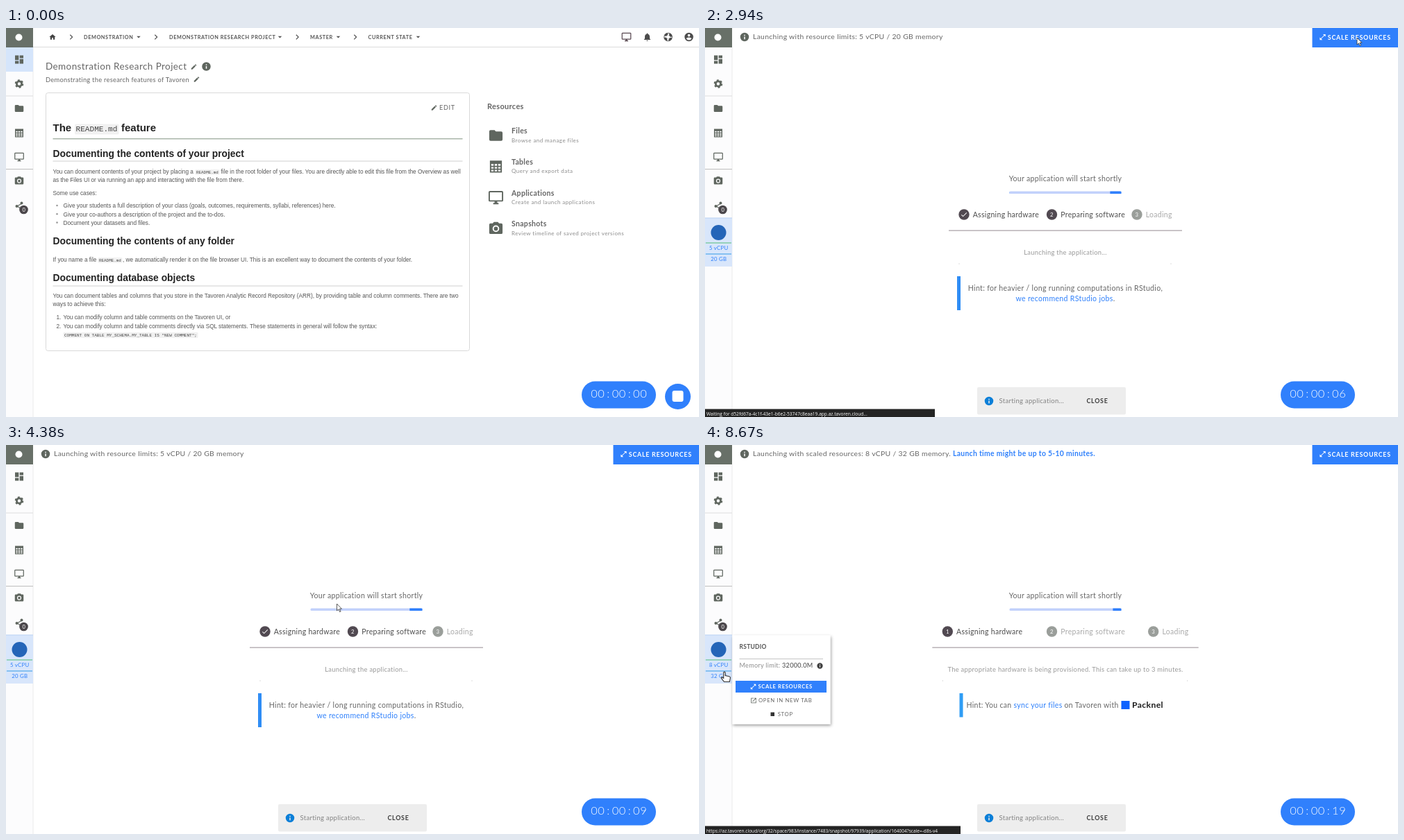
Write an HTML page that moves like this. It is 998 px wide and 561 px high and loops after 8700 ms.

```html
<!DOCTYPE html>
<html lang="en">
<head>
<meta charset="utf-8">
<title>Scaling an application</title>
<style>
html, body { margin: 0; width: 100%; height: 100%; overflow: hidden; background: #fff; }
svg { display: block; width: 998px; height: 561px; }
text { font-family: Lato, sans-serif; letter-spacing: .03em; fill: #666; white-space: pre; }
.b { font-weight: 700; }
.u { letter-spacing: .08em; }
.s { letter-spacing: .055em; fill: #8c8c8c; }
.w { fill: #fff; }
.m { text-anchor: middle; }
.l { fill: #2f80fb; }
.r { font-family: "Liberation Sans", Arial, sans-serif; letter-spacing: 0; fill: #555; }
.h { font-weight: 700; fill: #222; }
.c { font-family: "Liberation Mono", monospace; letter-spacing: 0; fill: #444; }
.st { font-family: "Open Sans", sans-serif; letter-spacing: 0; fill: #fff; }
.digit { font-weight: 300; letter-spacing: 0; }
</style>
</head>
<body>
<svg id="stage" viewBox="0 0 998 561" xmlns="http://www.w3.org/2000/svg"></svg>
<script>
const LOOP = 8700, BLUE = '#3080fc', GREY = '#5f665f';

const ICONS = {
  dash: 'M3 13h8V3H3zM3 21h8v-6H3zM13 21h8V11h-8zM13 3v6h8V3z',
  folder: 'M10 4H4a2 2 0 0 0-2 2v12a2 2 0 0 0 2 2h16a2 2 0 0 0 2-2V8a2 2 0 0 0-2-2h-8z',
  table: 'M3 3h18v18H3zM5 8v3h3.5V8zm5.2 0v3h3.6V8zm5.3 0v3H19V8zM5 12.6v2.6h3.5v-2.6zm5.2 0v2.6h3.6v-2.6zm5.3 0v2.6H19v-2.6zM5 16.8v2.4h3.5v-2.4zm5.2 0v2.4h3.6v-2.4zm5.3 0v2.4H19v-2.4z',
  screen: 'M21 2H3a2 2 0 0 0-2 2v12a2 2 0 0 0 2 2h7v2H8v2h8v-2h-2v-2h7a2 2 0 0 0 2-2V4a2 2 0 0 0-2-2zm0 14H3V4h18z',
  camera: 'M9 2 7.2 4H4a2 2 0 0 0-2 2v12a2 2 0 0 0 2 2h16a2 2 0 0 0 2-2V6a2 2 0 0 0-2-2h-3.2L15 2zm3 15a5 5 0 1 1 0-10 5 5 0 0 1 0 10zm0-2a3 3 0 1 0 0-6 3 3 0 0 0 0 6z',
  home: 'M10 20v-6h4v6h5v-8h3L12 3 2 12h3v8z',
  bell: 'M12 22a2 2 0 0 0 2-2h-4a2 2 0 0 0 2 2zm6-6v-5c0-3-1.6-5.6-4.5-6.3V4a1.5 1.5 0 0 0-3 0v.7C7.6 5.4 6 8 6 11v5l-2 2v1h16v-1z',
  pencil: 'M3 17.2V21h3.8L17.8 9.9l-3.7-3.7zM20.7 7a1 1 0 0 0 0-1.4l-2.3-2.3a1 1 0 0 0-1.4 0l-1.9 1.8 3.8 3.8z',
  info: 'M12 2a10 10 0 1 0 0 20 10 10 0 0 0 0-20zm1.2 15h-2.4v-6h2.4zm0-8h-2.4V6.6h2.4z',
  user: 'M12 2a10 10 0 1 0 0 20 10 10 0 0 0 0-20zm0 3a3 3 0 1 1 0 6 3 3 0 0 1 0-6zm0 14.2a7.2 7.2 0 0 1-6-3.2c0-2 4-3.1 6-3.1s6 1.1 6 3.1a7.2 7.2 0 0 1-6 3.2z',
  next: 'M8.6 16.6 13.2 12 8.6 7.4 10 6l6 6-6 6z',
  caret: 'M6 9.5l6 6 6-6z',
  open: 'M19 19H5V5h7V3H3v18h18v-9h-2zM14 3v2h3.6l-9.8 9.8 1.4 1.4L19 6.4V10h2V3z',
  scale: 'M21 11V3h-8l3.3 3.3-10 10L3 13v8h8l-3.3-3.3 10-10z',
  check: 'M9 16.2 4.8 12l-1.4 1.4L9 19 21 7l-1.4-1.4z',
  close: 'M19 6.4 17.6 5 12 10.6 6.4 5 5 6.4l5.6 5.6L5 17.6 6.4 19l5.6-5.6 5.6 5.6 1.4-1.4-5.6-5.6z',
  hand: 'M8 22 3 15.5q-1-2 .8-2.3L7 15V4.5a1.6 1.6 0 0 1 3.2 0V10l7.6 1.6q2.2.6 2.2 2.6L18.5 22z'
};

const icon = (name, x, y, size, fill = GREY, extra = '') =>
  `<path d="${ICONS[name]}" fill="${fill}" fill-rule="evenodd" transform="translate(${x - size / 2} ${y - size / 2}) scale(${size / 24})" ${extra}/>`;
const text = (x, y, size, str, cls = '', fill = '') =>
  `<text x="${x}" y="${y}" font-size="${size}" class="${cls}"${fill && ` style="fill:${fill}"`}>${str}</text>`;
const rect = (x, y, w, h, fill, extra = '') =>
  `<rect x="${x}" y="${y}" width="${w}" height="${h}" fill="${fill}" ${extra}/>`;
const disc = (x, y, r, fill, extra = '') => `<circle cx="${x}" cy="${y}" r="${r}" fill="${fill}" ${extra}/>`;
const group = (id, body, extra = '') => `<g id="${id}" ${extra}>${body}</g>`;

function topNav() {
  const crumbs = [['DEMONSTRATION', 94, 112, 191], ['DEMONSTRATION RESEARCH PROJECT', 216, 235, 394.5],
    ['MASTER', 419.5, 438, 478.5], ['CURRENT STATE', 503, 521.5, 593.5]];
  return rect(39, 27, 959, 1, '#dcdcdc') + icon('home', 67, 13, 11, '#444') +
    crumbs.map(([s, a, x, c]) => icon('next', a, 13, 15, '#555') +
      text(x, 16, 7.3, s, 'u b', '#555') + icon('caret', c, 13, 11, '#555')).join('') +
    icon('screen', 893.5, 13, 15, '#5a4a52') + icon('bell', 923.5, 13, 14, '#4c4c4c') +
    disc(953.5, 13, 4.4, 'none', 'stroke="#4c4c4c" stroke-width="3.4" stroke-dasharray="4.6 2.31" stroke-dashoffset="-1.2"') +
    disc(953.5, 13, 5.7, 'none', 'stroke="#4c4c4c"') + icon('user', 983.5, 13, 15, '#4c4c4c');
}

function readme() {
  const code = (x, y, s, size, w) => rect(x, y - size * .95, w, size * 1.35, '#f1f1f1', 'rx="1.5"') + text(x + 1.5, y, size, s, 'c');
  const p = (x, y, s) => text(x, y, 8.26, s, 'r');
  const h = (y, s, size = 13.85) => text(67.5, y, size, s, 'r h');
  const items = ['Give your students a full description of your class (goals, outcomes, requirements, syllabi, references) here.',
    'Give your co-authors a description of the project and the to-dos.', 'Document your datasets and files.'];
  return rect(57.5, 93.5, 610, 372, '#fff', 'rx="3" stroke="#d9d9d9"') +
    icon('pencil', 616.5, 115, 10) + text(624, 118, 9, 'EDIT', 'u') +
    h(149, 'The', 15) + code(99, 149, 'README.md', 11.1, 63.5) + text(166, 149, 15, 'feature', 'r h') +
    rect(67.5, 159, 590, 1.5, '#a9b6a9') +
    h(185.5, 'Documenting the contents of your project') + rect(67.5, 191.5, 590, 1, '#d0d0d0') +
    p(67.5, 209.5, 'You can document contents of your project by placing a') + code(272.5, 209.5, 'README.md', 5.9, 35) +
    p(309.5, 209.5, 'file in the root folder of your files. You are directly able to edit this file from the Overview as well') +
    p(67.5, 222, 'as the Files UI or via running an app and interacting with the file from there.') +
    p(67.5, 240.5, 'Some use cases:') +
    items.map((s, i) => disc(73.5, 256 + i * 12.3, 1.3, '#999') + p(82.5, 259.3 + i * 12.3, s)).join('') +
    h(312, 'Documenting the contents of any folder') +
    p(67.5, 336.5, 'If you name a file') + code(132.5, 336.5, 'README.md', 5.9, 35) +
    p(168, 336.5, ', we automatically render it on the file browser UI. This is an excellent way to document the contents of your folder.') +
    h(364.5, 'Documenting database objects') + rect(67.5, 371.5, 590, 1, '#d0d0d0') +
    p(67.5, 388.5, 'You can document tables and columns that you store in the Tavoren Analytic Record Repository (ARR), by providing table and column comments. There are two') +
    p(67.5, 401, 'ways to achieve this:') +
    p(72.5, 420, '1.') + p(82.5, 420, 'You can modify column and table comments on the Tavoren UI, or') +
    p(72.5, 432.5, '2.') + p(82.5, 432.5, 'You can modify column and table comments directly via SQL statements. These statements in general will follow the syntax:') +
    code(82.5, 444.5, 'COMMENT ON TABLE MY_SCHEMA.MY_TABLE IS "NEW COMMENT";', 6, 194);
}

function overview() {
  const links = [['folder', 'Files', 'Browse and manage files'], ['table', 'Tables', 'Query and export data'],
    ['screen', 'Applications', 'Create and launch applications'], ['camera', 'Snapshots', 'Review timeline of saved project versions']];
  return text(57, 60, 13.5, 'Demonstration Research Project') + icon('pencil', 270.5, 56, 10) + icon('info', 288.5, 55.5, 15) +
    text(57, 77.5, 9.3, 'Demonstrating the research features of Tavoren') + icon('pencil', 274.5, 74, 10) + readme() +
    text(693, 116.5, 11, 'Resources', 'b') +
    links.map(([i, a, b], n) => icon(i, 705.5, 155 + n * 44.8, 23) +
      text(728, 152 + n * 44.8, 10.5, a, 'b') + text(728, 164.5 + n * 44.8, 8, b, 's')).join('') +
    disc(967.5, 531.5, 18.5, BLUE) + rect(959.5, 523, 16, 16, '#fff', 'rx="3"');
}

const appList = () => text(57, 60, 13.5, 'Applications') + text(57, 77.5, 9.3, 'Create and launch applications') +
  rect(57.5, 188.5, 610, 44, '#fff', 'rx="3" stroke="#d9d9d9"') + disc(80, 210.5, 11, '#2465b8') + text(104, 214, 10.6, 'RStudio', 'l');

function sidebar() {
  const share = '<path d="M23 253 16 257l7 4" fill="none" stroke="#5f665f" stroke-width="1.2"/>' +
    disc(22.5, 252.5, 2, GREY) + disc(15.5, 257, 2, GREY) + disc(22, 261, 2, GREY);
  return rect(0, 0, 39, 561, '#fcfcfd') + rect(38.5, 28, 1, 533, '#ececec') +
    rect(0, 0, 39, 28, '#687068') + disc(18.5, 13.5, 5, '#fff') +
    group('navHome', rect(0, 28, 39, 35, '#d5e5fb')) + group('navApps', rect(0, 169, 39, 34, '#d5e5fb')) +
    icon('dash', 19, 45.5, 16) + disc(19, 80.5, 3.6, 'none', `stroke="${GREY}" stroke-width="2.8"`) +
    disc(19, 80.5, 5.3, 'none', `stroke="${GREY}" stroke-width="2" stroke-dasharray="2.8 2.75"`) +
    rect(0, 97.5, 39, 1, '#ddd') + icon('folder', 19, 116, 15) + icon('table', 19, 151.5, 16) + icon('screen', 19, 186, 15) +
    rect(0, 203, 39, 1.2, '#c4c4c4') + icon('camera', 19, 220.5, 15) + share +
    disc(25.5, 262, 6.3, '#4b474b') + text(25.7, 264.8, 7.5, '0', 'm w') +
    group('navR', rect(0, 274, 39, 70, '#d8e6fb') + rect(0, 273.5, 39, 1, '#bcd3f3') + disc(19.5, 295, 11, '#2465b8') +
      rect(1, 309, 37, 1.8, '#8fd0b4') + rect(1, 325, 37, 1.8, '#7dbcf0') +
      '<text id="cpu" x="19.7" y="320" font-size="7.8" class="m l"></text><text id="mem" x="19.7" y="336" font-size="7.8" class="m l"></text>');
}

function stepper(id, spread, active) {
  const labels = ['Assigning hardware', 'Preparing software', 'Loading'];
  const xs = [373 - spread, 499.5, 622 + spread];
  return group(id, labels.map((s, i) => {
    const on = i <= active;
    return disc(xs[i], 269, 7.7, on ? '#514951' : '#9a9e9a') +
      (i < active ? icon('check', xs[i], 269, 11, '#fff') : text(xs[i], 271.8, 7.8, i + 1, 'm w')) +
      text(xs[i] + 12.7, 272.5, 10.5, s, '', on ? '#4c4c4c' : '#a9a9a9');
  }).join('') + rect(351 - spread, 291.5, 336 + 2 * spread, 1.2, '#a59da3') +
    rect(365.5 - spread, 339.5, 1, 1, '#bbb') + rect(670.5 + spread, 339.5, 1, 1, '#bbb'));
}

const launch = () => text(519, 221, 10.6, 'Your application will start shortly', 'm') +
  rect(438.5, 235.5, 161, 3.6, '#c2d1fb', 'rx="1.5"') +
  group('bars', rect(0, 235.5, 0, 3.6, BLUE, 'id="short"') + rect(0, 235.5, 0, 3.6, BLUE, 'id="long"'), 'clip-path="url(#track)"') +
  stepper('stepsA', 0, 0) + stepper('stepsB', 0, 1) + stepper('stepsW', 23.7, 0) +
  '<text id="note" x="519" y="326.5" font-size="9.4" class="m" style="fill:#999"></text>' +
  group('hintJobs', rect(363, 358, 5, 49, '#2f8df5') + text(519, 378.5, 10.6, 'Hint: for heavier / long running computations in RStudio,', 'm') +
    text(519, 393.5, 10.6, '<tspan class="l">we recommend RStudio jobs</tspan>.', 'm')) +
  group('hintSync', rect(366.5, 358, 5, 34.5, '#2f9df5') +
    text(376.5, 379, 10.5, 'Hint: You can <tspan class="l">sync your files</tspan> on Tavoren with') +
    rect(599.5, 369, 12, 12, '#0f62fe') + text(615, 379.2, 12.2, 'Packnel', 'b', '#1b1b1b'));

const topBar = () => rect(39, 0, 959, 28, '#fff') + icon('info', 57, 13, 15) +
  '<text id="limits" x="69" y="16.3" font-size="10.4"></text>' +
  rect(874.5, 0, 123.5, 28, BLUE) + icon('scale', 889.5, 13, 11, '#fff') + text(896.8, 16.5, 8.95, 'SCALE RESOURCES', 'b u w');

function dialog() {
  const plans = [['8 vCPU / 32 GB', '0.07', '1.75'], ['16 vCPU / 64 GB', '0.15', '3.51'], ['32 vCPU / 128 GB', '0.29', '7.01'],
    ['64 vCPU / 256 GB', '0.58', '14.03'], ['120 vCPU / 456 GB', '0.71', '17.10']];
  return rect(374, 96, 249.5, 370, '#fff', 'rx="3" filter="url(#deep)"') +
    text(389, 121, 13.6, 'Scale resources', '', '#555') + icon('close', 597, 116.5, 15) +
    text(389, 149, 9.4, 'Select the required resource requirements - the', '', '#8d8d8d') +
    text(389, 162.5, 9.4, 'application will then be restarted.', '', '#8d8d8d') +
    text(399, 189.3, 8.9, 'CPU NODES', 'u', '#555') + text(477, 189.3, 8.9, 'GPU NODES', 'u', '#8a8a8a') +
    rect(389, 200, 78, 1.5, '#6a6068') +
    plans.map(([s, h, d], i) => {
      const y = 211.3 + i * 50.5;
      return rect(389, y, 219.5, 22.5, BLUE, i ? '' : 'id="first"') + text(498.8, y + 14.7, 9.8, s + ' mem', 'b m u w') +
        text(498.8, y + 33.7, 8.4, `Price: <tspan class="b">${h} credits / hour,</tspan> ${d} credits / day`, 'm') +
        (i < 4 ? rect(389, y + 39.8, 219.5, 1, '#c9c9c9') : '');
    }).join('');
}

const popup = () => rect(39.5, 274.5, 141, 128, '#fff', 'filter="url(#soft)"') +
  text(49.5, 294, 8.5, 'RSTUDIO', 'b', '#555') + rect(49.5, 308, 120.5, 1, '#c4c4c4') +
  text(49.5, 321.3, 9.1, 'Memory limit: <tspan style="fill:#444">32000.0M</tspan>', '', '#8d8d8d') + icon('info', 165.5, 318.5, 10, '#444') +
  rect(44, 340, 131, 17, BLUE) + icon('scale', 69.5, 348.5, 10, '#fff') + text(76.5, 351.3, 7.7, 'SCALE RESOURCES', 'b u w') +
  icon('open', 70, 368.5, 10) + text(77, 371.3, 7.8, 'OPEN IN NEW TAB', 'u') +
  rect(94.5, 385.5, 5.5, 5.5, '#333') + text(104.7, 391.2, 7.8, 'STOP', 'u');

const digits = Array.from({ length: 8 }, (_, i) => `<text x="${847 + i * 10.15}" y="533" font-size="16.5" class="m w digit"></text>`).join('');

document.getElementById('stage').innerHTML =
  `<defs><clipPath id="track"><rect x="438.5" y="235" width="161" height="5" rx="1.5"/></clipPath>
  <filter id="deep" x="-25%" y="-25%" width="150%" height="150%"><feDropShadow dx="0" dy="5" stdDeviation="11" flood-color="#3a1c3a" flood-opacity=".55"/></filter>
  <filter id="soft" x="-20%" y="-20%" width="140%" height="140%"><feDropShadow dx="1" dy="2" stdDeviation="2.2" flood-opacity=".4"/></filter></defs>` +
  rect(0, 0, 998, 561, '#fff') + group('nav', topNav()) + group('overview', overview()) + group('apps', appList()) +
  group('launch', launch()) + group('topBar', topBar()) + sidebar() + group('popup', popup()) +
  rect(0, 0, 998, 561, '#212121', 'id="shade"') + group('dialog', dialog()) +
  group('snack', rect(392, 518, 214, 39.5, '#ededed', 'rx="2"') + icon('info', 409, 538, 15, '#0b7fd8') +
    text(423.5, 541.3, 9.5, 'Starting application...', '', '#828282') + text(549.5, 541.3, 8.9, 'CLOSE', 'b u', '#3c3c3c')) +
  group('status', rect(0, 549.5, 331, 12, '#242424', 'id="statusBox"') + '<text id="statusText" x="2" y="558.6" font-size="6.6" class="st"></text>') +
  rect(829, 509.5, 107, 39, BLUE, 'rx="19.5"') + digits +
  group('arrow', '<path d="M0 0v10l2.4-2.1 1.7 3.8 1.5-.7-1.7-3.7h3.1z" fill="#fff" stroke="#333" stroke-width=".8"/>') +
  group('hand', icon('hand', 2.5, 8, 18, '#fff', 'stroke="#333" stroke-width="1.5"'));

const el = {};
document.querySelectorAll('#stage [id]').forEach(e => el[e.id] = e);
const digitEls = document.querySelectorAll('.digit');

const show = (id, on) => el[id].setAttribute('visibility', on ? 'visible' : 'hidden');
const put = (id, str) => {
  if (el[id].shown !== str) el[id].innerHTML = el[id].shown = str;
};
const clamp = v => Math.max(0, Math.min(1, v));
const mix = (a, b, k) => a + (b - a) * k;
const smooth = k => k * k * (3 - 2 * k);

function bezier(x1, y1, x2, y2) {
  const at = (a, b, s) => 3 * a * s * (1 - s) ** 2 + 3 * b * s * s * (1 - s) + s ** 3;
  return x => {
    let lo = 0, hi = 1;
    for (let i = 0; i < 24; i++) {
      const s = (lo + hi) / 2;
      if (at(x1, x2, s) < x) lo = s; else hi = s;
    }
    return at(y1, y2, lo);
  };
}
const ease = bezier(.25, .1, .25, 1), decel = bezier(0, 0, .2, 1);

const POINTER = [[30, 640, 296], [180, 67, 171], [330, 67, 171], [510, 18, 181], [780, 18, 181], [1140, 145, 210],
  [2130, 145, 210], [2940, 939, 14], [3545, 939, 14], [4020, 476.5, 229], [6930, 476.5, 229], [7380, 28, 326]];

function pointerAt(t) {
  const n = POINTER.findIndex(p => p[0] > t);
  if (n < 0) return POINTER[POINTER.length - 1].slice(1);
  if (n === 0) return POINTER[0].slice(1);
  const [ta, xa, ya] = POINTER[n - 1], [tb, xb, yb] = POINTER[n];
  const k = smooth((t - ta) / (tb - ta));
  return [mix(xa, xb, k), mix(ya, yb, k)];
}

// left and right are insets in percent of the track
function setBar(id, left, right) {
  el[id].setAttribute('x', 438.5 + 1.61 * left);
  el[id].setAttribute('width', Math.max(0, 161 - 1.61 * (left + right)));
}
function progress(t) {
  const phase = t < 0 ? 0 : t / 990 % 1;
  const a = ease(clamp(phase / .6)), b = ease(clamp((phase - .6) / .4));
  setBar('short', mix(-200, 107, a), mix(100, -8, a));
  setBar('long', mix(-90, 100, b), mix(100, -35, b));
}

function statusAt(t) {
  if (t >= 1650 && t < 2100) return ['Waiting for ingestion...', 331, mix(1, .25, clamp((t - 1950) / 90))];
  if (t >= 2700 && t < 3600) return ['Waiting for d52fd67a-4c1f-43e1-b6e2-53747c8eaa19.app.az.tavoren.cloud...', 331, 1];
  if (t >= 4700 && t < 5550) return ['Waiting for az-api.tavoren.cloud...', 331, 1];
  if (t >= 7400) return ['https://az.tavoren.cloud/org/32/space/983/instance/7483/snapshot/97939/application/164004?scale=-d8s-v4', 368, 1];
  return ['', 0, 0];
}

function draw(t) {
  const launching = t >= 1500, second = t >= 4700;
  const ready = second ? t >= 5550 : t >= 2400;
  const assigned = !second && t >= 2900, wide = second && ready;
  show('nav', t < 1350);
  show('overview', t < 690);
  show('apps', t >= 690 && t < 1350);
  show('navHome', t < 690);
  show('navApps', t >= 690 && t < 1350);
  show('launch', launching);
  show('bars', launching);
  show('stepsA', launching && !assigned && !wide);
  show('stepsB', assigned);
  show('stepsW', wide);
  show('hintJobs', ready && t < 7350);
  show('hintSync', t >= 7350);
  show('topBar', ready);
  show('navR', ready);
  show('popup', t >= 7410);
  put('cpu', second ? '8 vCPU' : '5 vCPU');
  put('mem', second ? '32 GB' : '20 GB');
  put('note', wide ? 'The appropriate hardware is being provisioned. This can take up to 3 minutes.' : 'Launching the application...');
  put('limits', second
    ? 'Launching with scaled resources: 8 vCPU / 32 GB memory. <tspan class="b l">Launch time might be up to 5-10 minutes.</tspan>'
    : 'Launching with resource limits: 5 vCPU / 20 GB memory');
  progress(t - (second ? 4810 : 1530));

  const grow = decel(clamp((t - 3396) / 101)), fade = 1 - clamp((t - 4260) / 90);
  show('dialog', grow > 0 && fade > 0);
  el.dialog.setAttribute('opacity', Math.min(1, grow * 1.2) * fade);
  el.dialog.setAttribute('transform', `translate(498.8 281) scale(${mix(.5, 1, grow)}) translate(-498.8 -281)`);
  el.shade.setAttribute('opacity', .46 * grow * fade);
  el.first.setAttribute('fill', t >= 3960 ? '#4a90fc' : BLUE);

  show('snack', t >= 2400);
  el.snack.setAttribute('transform', `translate(0 ${44 * (1 - decel(clamp((t - 2400) / 120)))})`);

  const [msg, width, alpha] = statusAt(t);
  put('statusText', msg);
  el.statusBox.setAttribute('width', width);
  el.status.setAttribute('opacity', alpha);

  const clock = '00:00:' + String(Math.floor((t + 40) / 450)).padStart(2, '0');
  digitEls.forEach((d, i) => { d.textContent = clock[i]; });

  const [x, y] = pointerAt(t), linked = t >= 7350;
  show('arrow', t >= 30 && !linked);
  show('hand', linked);
  for (const id of ['arrow', 'hand']) el[id].setAttribute('transform', `translate(${x} ${y})`);
}

const start = performance.now();
function tick() {
  draw((performance.now() - start) % LOOP);
  requestAnimationFrame(tick);
}
draw(0);
requestAnimationFrame(tick);
</script>
</body>
</html>
```
